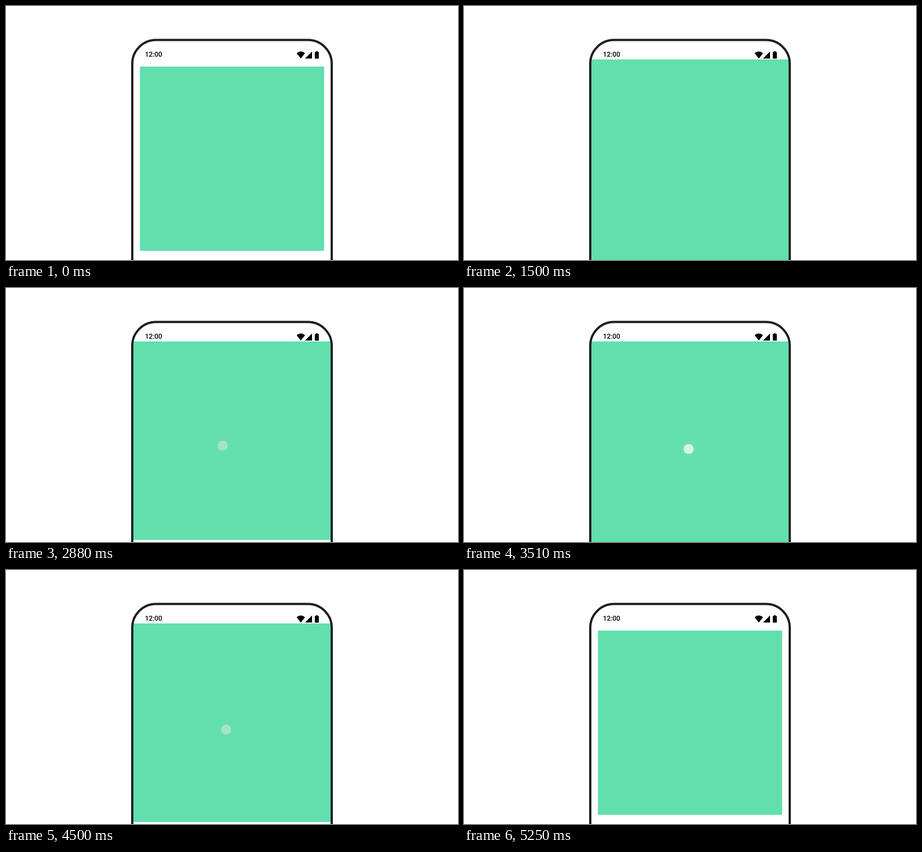
An HTML page with a canvas that plays this animation: 997 by 561 pixels, repeating every 6.18 s.

```html
<!DOCTYPE html>
<html lang="en">
<head>
<meta charset="utf-8">
<title>Animated padding</title>
<style>
  html, body { margin: 0; width: 100%; height: 100%; overflow: hidden; background: #fff; }
  canvas { display: block; width: 997px; height: 561px; }
</style>
</head>
<body>
<canvas id="stage" width="997" height="561"></canvas>
<script>
const ctx = document.getElementById('stage').getContext('2d');
const LOOP = 6180;
const STEP = 30;
const GREEN = '#61dfad';
const INK = '#1f2022';
const PADDING = 21;
const OMEGA = Math.sqrt(1500) / 1000; // critically damped spring, per ms

// down: finger lands, go: padding starts to move, end: everything at rest
const taps = [
  { down: 1260, go: 1350, end: 1500, x: 453, y: 339 },
  { down: 1950, go: 2010, end: 2220, x: 458, y: 338 },
  { down: 2760, go: 2820, end: 3000, x: 478, y: 348 },
  { down: 3510, go: 3630, end: 3780, x: 495.5, y: 355.5 },
  { down: 4350, go: 4440, end: 4620, x: 485.5, y: 352.5 },
  { down: 4980, go: 5100, end: 5250, x: 484, y: 359 }
];

function spring(ms) {
  if (ms <= 0) return 0;
  const k = OMEGA * ms;
  return 1 - (1 + k) * Math.exp(-k);
}

function growth(t) {
  let value = 0;
  taps.forEach((tap, i) => {
    if (t < tap.go) return;
    const p = t >= tap.end ? 1 : spring(t - tap.go + 10);
    value = i % 2 ? 1 - p : p;
  });
  return value * PADDING;
}

function polygon(points) {
  ctx.beginPath();
  points.forEach(([x, y]) => ctx.lineTo(x, y));
  ctx.closePath();
  ctx.fill();
}

function disc(x, y, r, color) {
  ctx.beginPath();
  ctx.arc(x, y, r, 0, Math.PI * 2);
  ctx.fillStyle = color;
  ctx.fill();
}

function drawBox(grow) {
  ctx.save();
  ctx.beginPath();
  ctx.rect(279, 118, 439, 443);
  ctx.clip();
  ctx.fillStyle = GREEN;
  ctx.fillRect(295.4 - grow, 133.8 - grow, 406.3 + 2 * grow, 407 + 2 * grow);
  ctx.restore();
}

function drawTouch(t) {
  const tap = taps.find(({ down, end }) => t >= down && t < end);
  if (!tap) return;
  const fade = Math.max(0, (t - tap.go + 30) / (tap.end - tap.go + 30));
  ctx.save();
  ctx.globalAlpha = 1 - Math.min(1, fade);
  disc(tap.x, tap.y, 15, 'rgba(255,255,255,0.13)');
  disc(tap.x, tap.y, 12.4, 'rgba(70,130,120,0.3)');
  disc(tap.x, tap.y, 11.3, '#cff5e5');
  ctx.restore();
}

function drawStatus() {
  ctx.fillStyle = '#000';
  ctx.font = '500 15px Roboto, sans-serif';
  ctx.textBaseline = 'alphabetic';
  ctx.fillText('12:00', 306.5, 111.5);

  // wifi
  ctx.beginPath();
  ctx.moveTo(650.3, 116);
  ctx.lineTo(641.2, 104.4);
  ctx.quadraticCurveTo(645, 100.6, 650.3, 100.6);
  ctx.quadraticCurveTo(655.6, 100.6, 659.4, 104.4);
  ctx.closePath();
  ctx.fill();

  // signal
  polygon([[675, 100.6], [675, 116], [659.6, 116]]);

  // battery
  ctx.beginPath();
  ctx.roundRect(681.2, 101.4, 8.8, 14.8, 0.9);
  ctx.fill();
  ctx.fillRect(683.7, 99.8, 3.8, 2.2);
}

function drawPhone() {
  ctx.beginPath();
  ctx.roundRect(278.5, 75.1, 440, 620, 52.5);
  ctx.strokeStyle = INK;
  ctx.lineWidth = 5;
  ctx.stroke();
}

function render(now) {
  const t = Math.floor((now % LOOP) / STEP) * STEP;
  ctx.fillStyle = '#fff';
  ctx.fillRect(0, 0, 997, 561);
  drawBox(growth(t));
  drawTouch(t);
  drawPhone();
  drawStatus();
}

const start = performance.now();
function tick() {
  render(performance.now() - start);
  requestAnimationFrame(tick);
}
tick();
</script>
</body>
</html>
```
